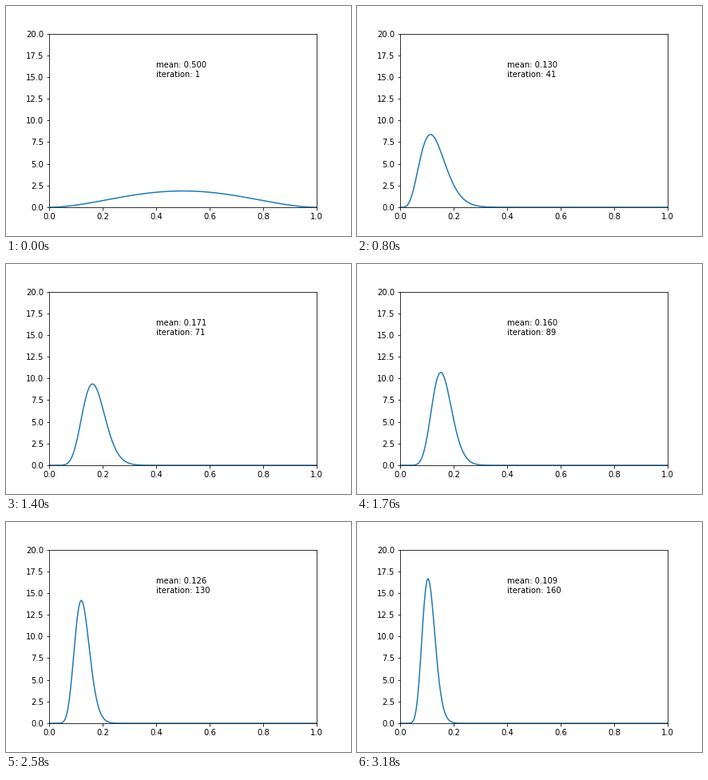
These frames come from a looping animation (432 by 288 pixels, 3200 ms). A matplotlib script:

```python
from math import comb

import matplotlib.pyplot as plt
import numpy as np
from matplotlib.animation import FuncAnimation

FRAMES = 160
INTERVAL = 20  # ms
PRIOR = 3      # Beta(3, 3)

# Iterations whose posterior first includes a new success.
HITS = [18, 22, 26, 42, 46, 50, 54, 57, 63, 69, 75, 80, 129, 130, 158]


def beta_pdf(x, a, b):
    """Beta density for whole-number parameters."""
    n = a + b
    scale = float((n - 1) * comb(n - 2, a - 1))
    return scale * x ** (a - 1) * (1 - x) ** (b - 1)


plt.rcParams["font.family"] = "DejaVu Sans"
fig, ax = plt.subplots(figsize=(6, 4), dpi=72)
fig.subplots_adjust(bottom=0.125)
ax.set_xlim(0, 1)
ax.set_ylim(0, 20)

x = np.linspace(0, 1, 200)
line, = ax.plot(x, np.zeros_like(x))
label = ax.text(0.4, 15, "")


def update(frame):
    iteration = frame + 1
    hits = sum(h <= iteration for h in HITS)
    a = PRIOR + hits
    b = PRIOR + frame - hits
    line.set_ydata(beta_pdf(x, a, b))
    label.set_text(f"mean: {a / (a + b):.3f}\niteration: {iteration}")
    return line, label


anim = FuncAnimation(fig, update, frames=FRAMES, interval=INTERVAL,
                     init_func=lambda: update(0), repeat=True, repeat_delay=0)
plt.show()
```
